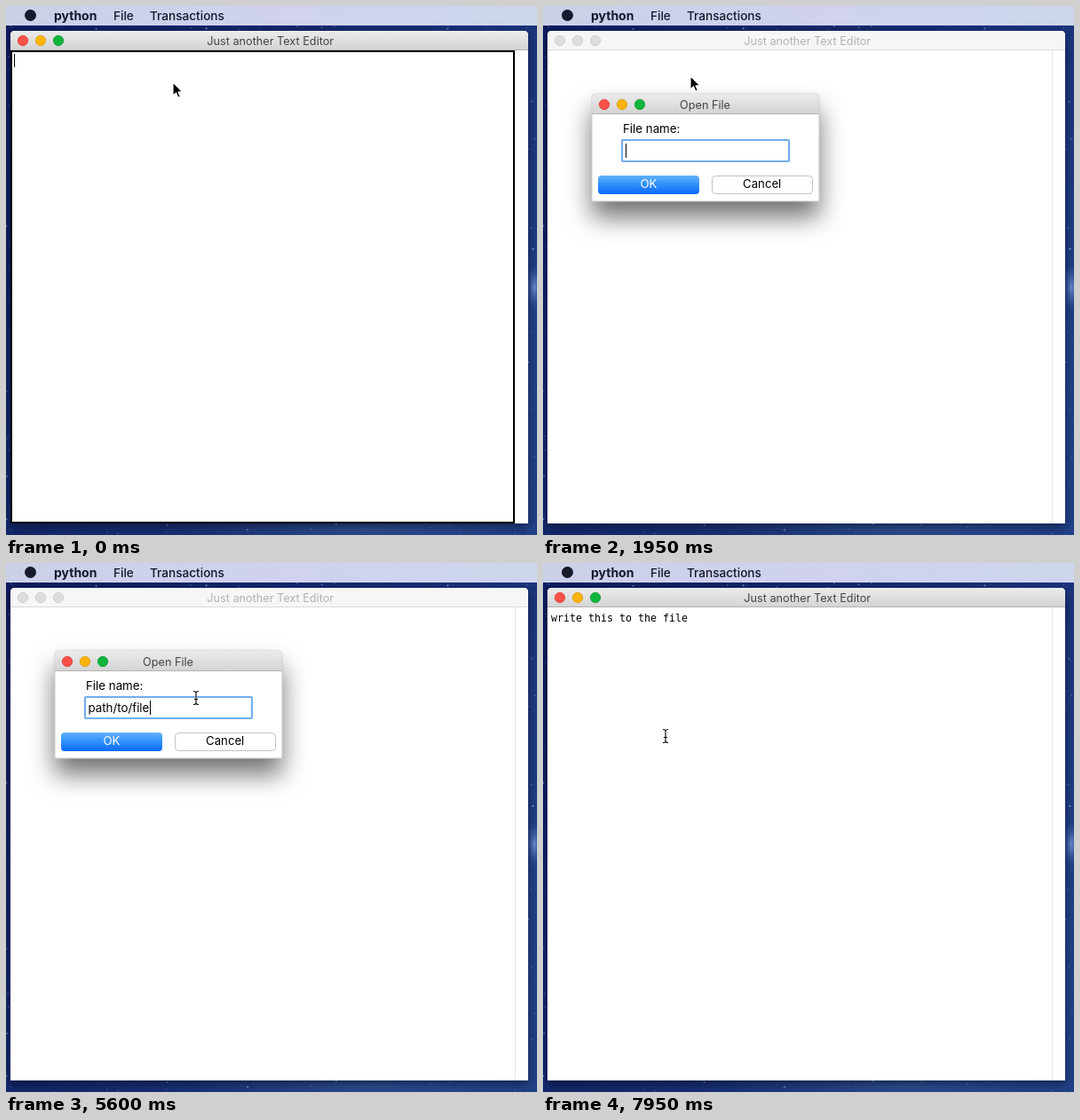
An HTML page that plays this animation: 598 by 596 pixels, repeating every 8000 ms.

```html
<!DOCTYPE html>
<html lang="en">
<head>
<meta charset="utf-8">
<title>Text editor</title>
<style>
html, body { margin: 0; width: 100%; height: 100%; overflow: hidden; background: #14276b; }
svg { display: block; width: 100vw; height: 100vh; cursor: default; }
text { font-family: Inter, Roboto, sans-serif; font-size: 13.3px; fill: #000; white-space: pre; }
.bar { font-size: 13.6px; fill: #15182b; font-weight: 450; }
.title { font-size: 12.7px; text-anchor: middle; fill: #454545; }
.item { fill: #24262d; }
.btn { text-anchor: middle; font-size: 13.2px; }
.mono { font-family: "DejaVu Sans Mono", "Noto Sans Mono", monospace; font-size: 11.63px; }
</style>
</head>
<body>
<svg viewBox="0 0 598 596" preserveAspectRatio="none">
  <defs>
    <linearGradient id="sky" x1="0" y1="0" x2="1" y2="0.6">
      <stop offset="0" stop-color="#0b1a5c"/>
      <stop offset="0.55" stop-color="#152b70"/>
      <stop offset="1" stop-color="#203f85"/>
    </linearGradient>
    <radialGradient id="glow">
      <stop offset="0" stop-color="#7fa4e0" stop-opacity="0.8"/>
      <stop offset="1" stop-color="#3f67b4" stop-opacity="0"/>
    </radialGradient>
    <linearGradient id="menubar">
      <stop offset="0" stop-color="#cbd0e9"/>
      <stop offset="0.55" stop-color="#d0d2ee"/>
      <stop offset="1" stop-color="#cdd6ed"/>
    </linearGradient>
    <linearGradient id="chrome" x2="0" y2="1">
      <stop offset="0" stop-color="#ebebeb"/>
      <stop offset="1" stop-color="#d3d3d3"/>
    </linearGradient>
    <linearGradient id="blue" x2="0" y2="1">
      <stop offset="0" stop-color="#62b1fa"/>
      <stop offset="0.5" stop-color="#2f8ffb"/>
      <stop offset="1" stop-color="#0a69fd"/>
    </linearGradient>
    <filter id="deep" x="-30%" y="-50%" width="160%" height="210%">
      <feDropShadow dx="0" dy="18" stdDeviation="14" flood-color="#000" flood-opacity="0.55"/>
    </filter>
    <filter id="soft" x="-30%" y="-30%" width="160%" height="170%">
      <feDropShadow dx="0" dy="4" stdDeviation="5" flood-color="#000" flood-opacity="0.35"/>
    </filter>
    <filter id="edge" x="-5%" y="-5%" width="110%" height="110%">
      <feDropShadow dx="0" dy="5" stdDeviation="6" flood-color="#000" flood-opacity="0.4"/>
    </filter>
  </defs>

  <rect width="598" height="596" fill="url(#sky)"/>
  <ellipse cx="595" cy="317" rx="9" ry="26" fill="url(#glow)"/>
  <ellipse cx="400" cy="590" rx="230" ry="14" fill="url(#glow)" opacity="0.25"/>
  <g id="stars"></g>

  <rect width="598" height="22" fill="url(#menubar)"/>
  <circle cx="27.5" cy="10.5" r="6.5" fill="#171a2c"/>
  <rect id="fileHit" x="112" width="41" height="22" fill="#0b5cda"/>
  <text class="bar" x="54" y="16" style="font-weight:700;font-size:14px">python</text>
  <text class="bar" id="fileText" x="121" y="16">File</text>
  <text class="bar" x="162" y="16">Transactions</text>

  <path d="M5 583V33q0-5 5-5H583q5 0 5 5V583Z" fill="#fff" filter="url(#edge)"/>
  <path id="mainBar" d="M5 50V33q0-5 5-5H583q5 0 5 5V50Z"/>
  <path id="mainLine" d="M5 49.5H588"/>
  <g id="mainLights"></g>
  <text class="title" id="mainTitle" x="297.7" y="44">Just another Text Editor</text>
  <path d="M573.5 50V583" stroke="#e6e6e6"/>
  <rect id="focus" x="6" y="51" width="566" height="531" fill="none" stroke="#000" stroke-width="2"/>
  <path id="mainCaret" d="M9.5 54V69" stroke="#000"/>
  <text class="mono" id="content" x="9" y="66">write this to the file</text>

  <g id="menu">
    <path d="M112 22H198V113q0 5-5 5H117q-5 0-5-5Z" fill="#e9ebf1" stroke="#b9bcc8" stroke-width="0.5" filter="url(#soft)"/>
    <rect id="pick" x="112" width="86" height="19" fill="#2478f8"/>
    <path d="M112 89.5H198" stroke="#d0d2da" stroke-width="2"/>
    <g id="items"></g>
  </g>

  <g id="dialog">
    <path d="M55 220V103q0-4 4-4H307q4 0 4 4V220Z" fill="#fff" stroke="#a5a5a5" stroke-width="0.6" filter="url(#deep)"/>
    <g id="form">
      <path d="M55 122V104q0-5 5-5H306q5 0 5 5V122Z" fill="url(#chrome)"/>
      <path d="M55 121.5H311" stroke="#b4b4b4"/>
      <g id="formLights"></g>
      <text class="title" x="182.5" y="116">Open File</text>
      <text x="90" y="143">File name:</text>
      <rect x="89" y="151" width="188" height="24" rx="1" fill="#fff" stroke="#72aeec" stroke-width="2.2"/>
      <text id="typed" x="92.5" y="168"></text>
      <path id="caret" stroke="#000"/>
      <rect id="ok" x="62" y="191" width="114" height="21" rx="4" fill="url(#blue)"/>
      <text class="btn" x="119" y="205" style="fill:#fff">OK</text>
      <rect x="190.5" y="191.5" width="113" height="20" rx="4" fill="#fff" stroke="#c3c3c3"/>
      <text class="btn" x="246.7" y="205">Cancel</text>
    </g>
  </g>

  <path id="arrow" d="M0 0V15L3.5 11.8L5.8 17.2L8.3 16.1L6 10.9H10.8Z" fill="#000" stroke="#fff" stroke-width="1.1" stroke-linejoin="round"/>
  <g id="beam" fill="none">
    <path d="M-3-7.5Q0-7.5 0-5.5Q0-7.5 3-7.5M0-6V6M-3 7.5Q0 7.5 0 5.5Q0 7.5 3 7.5M-2 1.5H2" stroke="#fff" stroke-width="2.4" opacity="0.7"/>
    <path d="M-3-7.5Q0-7.5 0-5.5Q0-7.5 3-7.5M0-6V6M-3 7.5Q0 7.5 0 5.5Q0 7.5 3 7.5M-2 1.5H2" stroke="#111" stroke-width="1.2"/>
  </g>
</svg>
<script>
const LOOP = 8000;
const MENU_OPEN = 500, PICKED = 1150, DIALOG = 1350, READY = 1600, PRESS = 7650, CLOSE = 7800;
const NAME = "path/to/file.txt";
const KEYS = [2550, 2700, 2800, 2950, 3500, 3850, 4000, 4300, 4700, 4850, 5000, 5200, 5900, 6200, 6350, 6500];
// Pointer stops: time, x, y
const STOPS = [
  [0, 188, 86], [80, 188, 86], [420, 132, 12], [540, 132, 13], [800, 149, 45], [1000, 149, 53],
  [1750, 149, 53], [2350, 214, 152], [7050, 214, 152], [7300, 177, 184], [7550, 138, 195]
];
const ITEMS = [["New", 25], ["Open...", 45], ["Save", 64], ["Exit", 95]];

const $ = id => document.getElementById(id);
const set = (el, attrs) => { for (const k in attrs) el.setAttribute(k, attrs[k]); };
const show = (id, on) => $(id).setAttribute("visibility", on ? "inherit" : "hidden");
const clamp = v => Math.max(0, Math.min(1, v));

function add(parent, tag, attrs, text = "") {
  const el = document.createElementNS("http://www.w3.org/2000/svg", tag);
  set(el, attrs);
  el.textContent = text;
  return parent.appendChild(el);
}

function addStars() {
  let seed = 41;
  const rnd = () => (seed = seed * 16807 % 2147483647) / 2147483647;
  for (let i = 0; i < 2400; i++) {
    const x = rnd() * 598, y = 22 + rnd() * 574, r = 0.3 + rnd() ** 3 * 0.9, opacity = 0.2 + rnd() * 0.5;
    if (x < 5 || x > 588 || y < 28 || y > 583) add($("stars"), "circle", { cx: x, cy: y, r, fill: "#8fabe0", opacity });
  }
}

const LIGHTS = [["#fc5148", "#dd4038"], ["#fdb40a", "#dc9a0c"], ["#0fb53c", "#129a33"]];
const addLights = (group, x, y) => LIGHTS.map(([fill, stroke], i) =>
  add(group, "circle", { cx: x + 20 * i, cy: y, r: 5.7, fill, stroke, "stroke-width": 0.8 }));

addStars();
const mainLights = addLights($("mainLights"), 19, 39);
addLights($("formLights"), 69, 111);
const items = ITEMS.map(([label, y]) => add($("items"), "text", { class: "item", x: 133, y: y + 14 }, label));

function pointerAt(t) {
  let i = 0;
  while (i < STOPS.length - 2 && t >= STOPS[i + 1][0]) i++;
  const [t0, x0, y0] = STOPS[i], [t1, x1, y1] = STOPS[i + 1];
  const u = clamp((t - t0) / (t1 - t0)), k = u * u * (3 - 2 * u);
  return [x0 + (x1 - x0) * k, y0 + (y1 - y0) * k];
}

function drawMain(t, blink) {
  const active = t < READY || t >= CLOSE;
  set($("mainBar"), { fill: active ? "url(#chrome)" : "#f6f6f6" });
  set($("mainLine"), { stroke: active ? "#b4b4b4" : "#dadada" });
  $("mainTitle").style.fill = active ? "#454545" : "#b3b3b3";
  mainLights.forEach((el, i) => set(el, {
    fill: active ? LIGHTS[i][0] : "#dddddd",
    stroke: active ? LIGHTS[i][1] : "#cbcbcb"
  }));
  show("focus", t < READY);
  show("mainCaret", t < DIALOG && blink);
  show("content", t >= CLOSE);
}

function drawMenu(t, y) {
  const lit = t >= MENU_OPEN && t < READY;
  show("fileHit", lit);
  $("fileText").style.fill = lit ? "#fff" : "";
  show("menu", t >= MENU_OPEN && t < PICKED + 150);
  set($("menu"), { opacity: 1 - clamp((t - PICKED) / 150) });
  const flash = t >= PICKED - 100 && t < PICKED - 50;
  const hit = flash ? -1 : ITEMS.findIndex(([, top]) => y >= top && y < top + 19);
  show("pick", lit && t < PICKED + 150 && hit >= 0);
  if (hit >= 0) set($("pick"), { y: ITEMS[hit][1] });
  items.forEach((el, i) => el.style.fill = i === hit ? "#fff" : "");
}

function drawDialog(t, blink) {
  show("dialog", t >= DIALOG && t < CLOSE);
  show("form", t >= READY);
  const typed = $("typed");
  typed.textContent = NAME.slice(0, KEYS.filter(k => k <= t).length);
  const x = Math.round(93 + typed.getComputedTextLength()) + 0.5;
  set($("caret"), { d: `M${x} 155V171` });
  show("caret", blink);
  set($("ok"), { fill: t >= PRESS ? "#0a5fe0" : "url(#blue)" });
}

function draw(t) {
  const [x, y] = pointerAt(t);
  const blink = (t - 2980 + 3600) % 900 >= 300;
  drawMain(t, blink);
  drawMenu(t, y);
  drawDialog(t, blink);
  const inField = t >= READY && x > 89 && x < 277 && y > 150 && y < 176;
  const beam = inField || t >= CLOSE;
  show("beam", beam);
  show("arrow", !beam);
  set($(beam ? "beam" : "arrow"), { transform: `translate(${x} ${y})` });
}

const start = performance.now();
function tick() {
  draw((performance.now() - start) % LOOP);
  requestAnimationFrame(tick);
}
tick();
</script>
</body>
</html>
```
